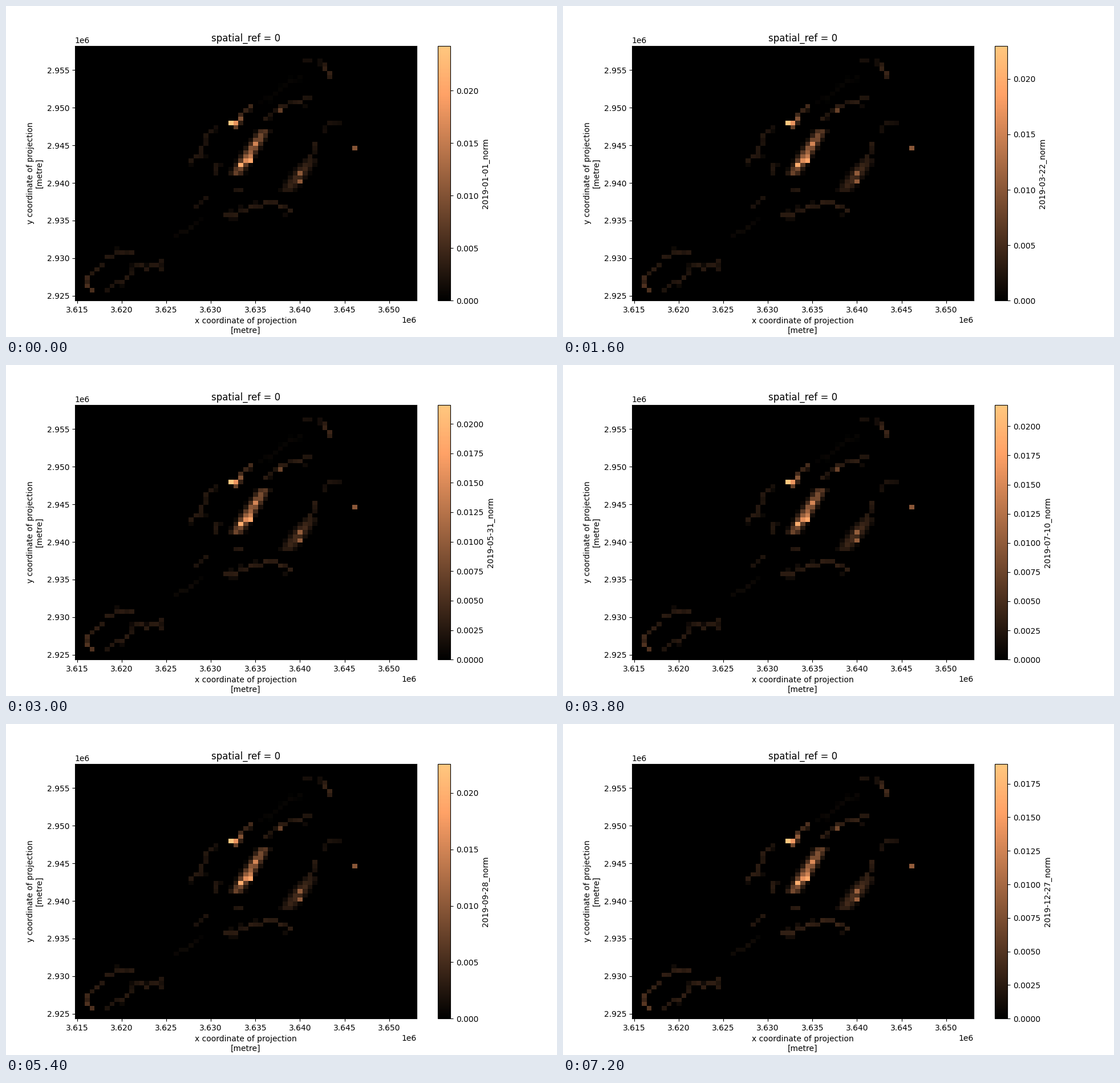
A matplotlib script that plays this animation: 966 by 580 pixels, repeating every 7.4 s.

```python
import numpy as np
import matplotlib.pyplot as plt
from matplotlib.animation import FuncAnimation

COLS, ROWS, CELL = 69, 61, 555
LEFT, BOTTOM = 3614760, 2924370
FRAMES, STEP_MS, STEP_DAYS = 37, 200, 10
REF_MAX = 0.0243

# Peak value over the year: step -> value
PEAKS = {0: .02427, 4: .0253, 5: .018675, 6: .022, 10: .024, 11: .02621,
         12: .0245, 15: .021617, 23: .02208, 27: .0226, 35: .0219, 36: .018993}

rng = np.random.default_rng(4)
base = np.zeros((ROWS, COLS))


def light(c, r, v):
    base[r, c] = max(base[r, c], v)


def stroke(v, *pts):
    """Chain of flickering cells with a faint, patchy fringe."""
    for (c0, r0), (c1, r1) in zip(pts, pts[1:]):
        n = max(abs(c1 - c0), abs(r1 - r0))
        for k in range(n + 1):
            c, r = round(c0 + (c1 - c0) * k / n), round(r0 + (r1 - r0) * k / n)
            light(c, r, v * rng.uniform(.7, 1.25))
            if rng.random() < .4:
                light(c + rng.integers(-1, 2), r + rng.integers(-1, 2), v * .4)


def ridge(v, width, start, end):
    """Band that fades sideways and towards both ends."""
    (c0, r0), (c1, r1) = start, end
    slope = (c1 - c0) / (r1 - r0)
    for r in range(round(r0), round(r1) + 1):
        t = (r - r0) / (r1 - r0)
        d = (np.arange(COLS) - c0 - slope * (r - r0)) / np.hypot(1, slope)
        row = v * (.6 + .4 * np.sin(np.pi * t)) * np.exp(-(d / width) ** 2)
        row = np.where(row < .02, 0, row)
        base[r] = np.maximum(base[r], row)


# South-west ring
stroke(.19, (3, 58), (2, 57), (2, 55))
stroke(.12, (3, 54), (5, 52))
stroke(.1, (6, 50), (9, 49), (11, 49))
stroke(.1, (6, 58), (10, 55), (12, 52), (14, 53), (17, 51), (17, 53))

# Southern shore
stroke(.04, (20, 45), (24, 42))
stroke(.09, (24, 38), (26, 36))
stroke(.12, (30, 40), (32, 40), (35, 38), (40, 37), (43, 39))
stroke(.13, (32, 34), (33, 34))

# North-west arm
stroke(.18, (33, 18), (33, 16), (35, 14))
stroke(.09, (28, 19), (26, 21), (25, 26), (23, 27))
stroke(.12, (28, 28), (28, 30))

# North-east arm
stroke(.11, (38, 17), (41, 14), (44, 13), (47, 12))
stroke(.02, (37, 13), (45, 7))
stroke(.08, (46, 3), (47, 3))
stroke(.14, (50, 4), (51, 6), (51, 7))
stroke(.11, (47, 27), (48, 23))
stroke(.07, (50, 20), (51, 18), (53, 18))

ridge(.5, 1, (37.6, 20), (31.9, 30.5))
ridge(.22, 1.2, (47, 27), (42.5, 34))

# Brightest single cells
for c, r, v in [(31, 18, 1), (32, 18, .74), (32, 19, .3), (33, 17, .4),
                (36, 23, .66), (35, 26, .62), (35, 27, .83), (34, 27, .7),
                (33, 28, .86), (41, 15, .32), (45, 30, .45), (45, 32, .45),
                (56, 24, .42)]:
    light(c, r, v)

fig, ax = plt.subplots(figsize=(9.66, 5.8), dpi=100)
x_edges = LEFT + CELL * np.arange(COLS + 1)
y_edges = BOTTOM + CELL * np.arange(ROWS, -1, -1)
mesh = ax.pcolormesh(x_edges, y_edges, base * REF_MAX, cmap="copper",
                     vmin=0, vmax=REF_MAX)
ax.set_xlim(x_edges[0], x_edges[-1])
ax.set_ylim(y_edges[-1], y_edges[0])
ax.set_title("spatial_ref = 0")
ax.set_xlabel("x coordinate of projection\n[metre]")
ax.set_ylabel("y coordinate of projection\n[metre]")
bar = fig.colorbar(mesh, ax=ax)


def update(i):
    peak = np.interp(i, list(PEAKS), list(PEAKS.values()))
    # A lower peak lifts the dim cells relative to the brightest one
    mesh.set_array(base ** np.sqrt(peak / REF_MAX) * peak)
    mesh.set_clim(0, peak)
    day = np.datetime64("2019-01-01") + STEP_DAYS * i
    bar.set_label(f"{day}_norm")
    return [mesh]


anim = FuncAnimation(fig, update, frames=FRAMES, interval=STEP_MS,
                     init_func=lambda: update(0), repeat=True, repeat_delay=0)
plt.show()
```
